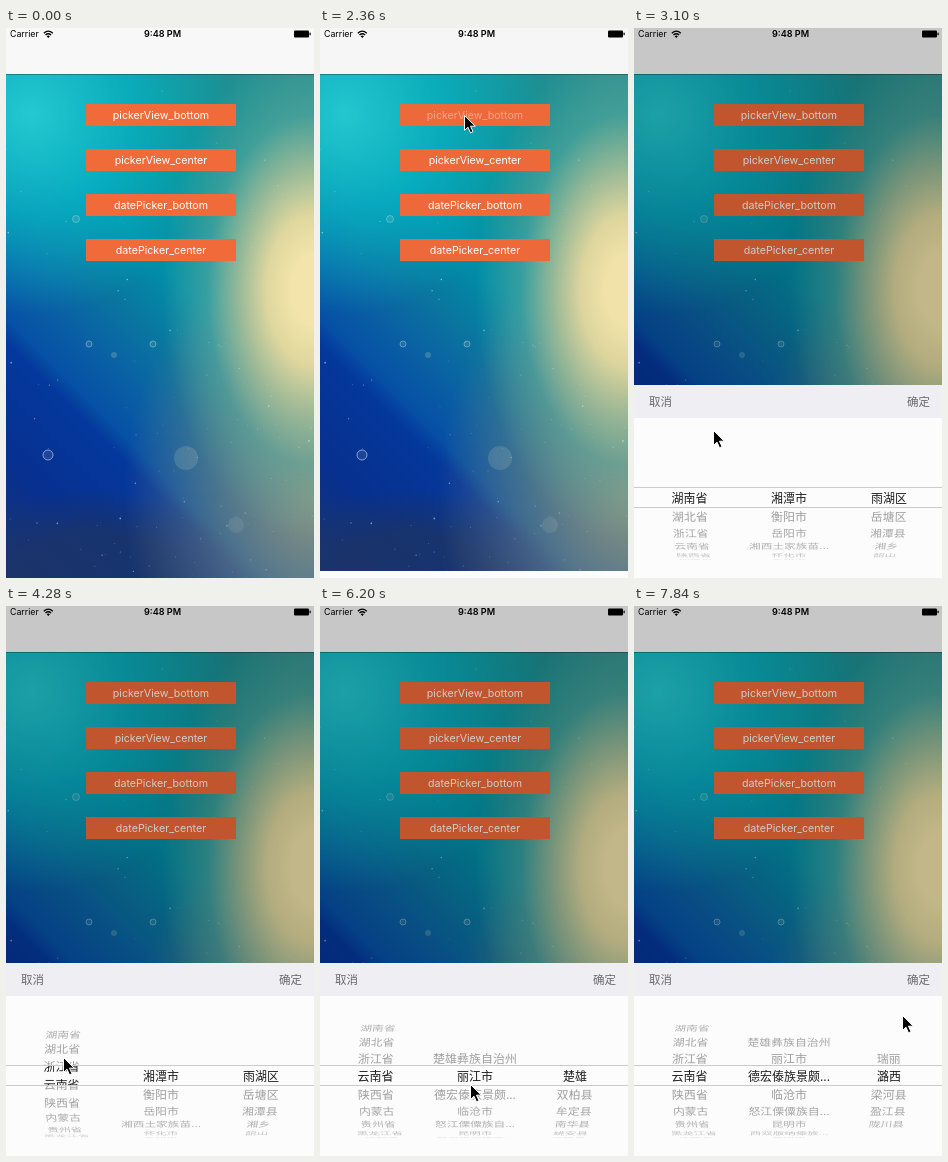
An HTML page that plays this animation: 308x550 px, repeating every 7.99 s.

```html
<!DOCTYPE html>
<html lang="zh-CN">
<head>
<meta charset="utf-8">
<title>Picker demo</title>
<style>
html, body { margin: 0; width: 100%; height: 100%; overflow: hidden; }
#stage { position: relative; width: 308px; height: 550px; overflow: hidden; background: #f8f8f8;
  font-family: Inter, Roboto, "Liberation Sans", sans-serif; }
#stage div, #stage svg { position: absolute; }

#nav { left: 0; top: 0; width: 308px; height: 46px; border-bottom: 1px solid #0000004d; color: #000; }
#nav div { line-height: 12px; top: 0; white-space: nowrap; }
.carrier { left: 4px; font-size: 8.8px; }
.clock { left: 0; width: 313px; text-align: center; font-size: 9.1px; font-weight: 600; }

#sea { left: 0; top: 46px; width: 308px; height: 504px; background:
  radial-gradient(ellipse 150px 250px at 306px 216px, #f2e4aa 0 14%, #dfd79e 30%, #a8bf98e0 49%, #62ad9e88 70%, #40a09800),
  radial-gradient(ellipse 190px 250px at 308px 420px, #a3997dd8, #77867e98 50%, #60808000),
  radial-gradient(circle 200px at 25px 40px, #24c8d0, #08b8cab0 50%, #00a0b800),
  radial-gradient(ellipse 150px 90px at 90px 504px, #1b3468d8 50%, #1b346800),
  linear-gradient(225deg, #2a8f8f, #0a9098 30%, #0090a8 42%, #0a76a0 52%, #0a62a4 60%, #0650a6 68%, #04389c 71%, #073090 85%, #1a3470); }
#specks { left: 0; top: 0; }

.button { left: 80px; width: 150px; height: 22px; line-height: 23px; background: #f06a3a;
  color: #fff; font-size: 10.65px; text-align: center; }
.pressed { color: #ffffff66; }
#dim { inset: 0; background: #000; opacity: 0; }

#sheet { left: 0; top: 0; width: 308px; height: 193px; overflow: hidden; background: #fcfcfc;
  font-family: "Noto Sans CJK SC", "Noto Sans CJK JP", sans-serif; }
#bar { left: 0; top: 0; width: 308px; height: 33px; line-height: 32px; font-size: 11.5px; color: #6a6a6c; }
.open #bar { background: #eeeef3; }
.layer { inset: 0; }
.band { background: #fcfcfc; clip-path: inset(103px 0 71px 0); }
.row { left: -60px; top: -9px; width: 120px; line-height: 18px; font-size: 12px; text-align: center;
  color: #1c1c1c; white-space: nowrap; }
#lines { left: 0; top: 102px; width: 308px; height: 19px; }
.open #lines { border: solid #cbcbcd; border-width: 1px 0; }
#cursor { left: 0; top: 0; overflow: visible; }
</style>
</head>
<body>
<div id="stage">
  <div id="sea"></div>
  <svg id="specks" width="308" height="550"></svg>
  <div id="nav">
    <div class="carrier">Carrier</div>
    <svg style="left:37px;top:2px" width="11" height="9" fill="none" stroke="#000" stroke-width="1.3">
      <path d="M.8 3.2Q5.3 -.9 9.8 3.2M2.5 5Q5.3 2.5 8.1 5"/><path d="M3.7 6.2Q5.3 4.8 6.9 6.2L5.3 8Z" fill="#000" stroke="none"/>
    </svg>
    <div class="clock">9:48 PM</div>
    <svg style="left:288px;top:2px" width="18" height="8"><rect y=".4" width="15" height="7" rx="1.2"/><rect x="15.5" y="2.6" width="1.2" height="2.6" rx=".5"/></svg>
  </div>
  <div id="buttons"></div>
  <div id="dim"></div>
  <div id="sheet">
    <div id="bar"><div style="left:15px">取消</div><div style="left:273px">确定</div></div>
    <div class="layer"></div>
    <div class="layer band"></div>
    <div id="lines"></div>
  </div>
  <svg id="cursor" width="13" height="19">
    <path d="M.5 .5V15.4L4 12.2L6.5 17.8L9 16.7L6.5 11.2H11.3Z" fill="#000" stroke="#fff"/>
  </svg>
</div>
<script>
const LOOP = 7990, STEP = 147.6, LAST = 53;   // the screen is sampled about 7 times a second
const $ = id => document.getElementById(id);

function add(parent, cls, text) {
  const el = document.createElement('div');
  el.className = cls;
  el.textContent = text;
  parent.append(el);
  return el;
}

// Smooth 0..1 between two times
function ease(t, from, to) {
  const u = Math.min(1, Math.max(0, (t - from) / (to - from)));
  return u * u * (3 - 2 * u);
}

// Bubbles and specks in the water
function drawSpecks() {
  let seed = 11, out = '';
  const rnd = () => (seed = seed * 16807 % 2147483647) / 2147483647;
  const dot = (x, y, r, alpha, ring = 0) => out +=
    `<circle cx="${x}" cy="${y}" r="${r}" fill="#e8eecb" fill-opacity="${alpha}" stroke="#cfe8ee" stroke-opacity="${ring}"/>`;
  for (let i = 0; i < 110; i++)
    dot(308 * rnd(), 50 + 498 * Math.sqrt(rnd()), .4 + .5 * rnd() ** 2, .2 + .5 * rnd());
  dot(70, 191, 3.5, .1, .35);
  dot(83, 316, 3, .1, .4);
  dot(147, 316, 3, .1, .4);
  dot(42, 427, 5, .1, .6);
  dot(108, 327, 3, .2);
  dot(180, 430, 12, .15);
  dot(230, 497, 8, .1);
  $('specks').innerHTML = out;
}
drawSpecks();

const buttons = ['pickerView_bottom', 'pickerView_center', 'datePicker_bottom', 'datePicker_center'].map((name, i) => {
  const el = add($('buttons'), 'button', name);
  el.style.top = 76 + 45 * i + 'px';
  return el;
});

// A wheel exists between two steps and rolls by some rows while it is dragged
const layers = document.querySelectorAll('.layer');
function wheel(x, names, { from = 0, to = 99, roll = 0, start = 0, end = 1 }) {
  const rows = names.split(' ').map(name => [...layers].map(l => add(l, 'row', name)));
  return { x, rows, from, to, pos: k => roll * ease(k, start, end) };
}
const RELOAD = 32, RELOAD_AREA = 48;
const wheels = [
  wheel(55.5, '湖南省 湖北省 浙江省 云南省 陕西省 内蒙古 贵州省 黑龙江省 江西省', { roll: 3, start: 26, end: 30 }),
  wheel(155, '湘潭市 衡阳市 岳阳市 湘西土家族苗... 怀化市 永州市', { to: RELOAD }),
  wheel(155, '楚雄彝族自治州 丽江市 德宏傣族景颇... 临沧市 怒江傈僳族自... 昆明市 西双版纳傣族... 保山市',
    { from: RELOAD, roll: 2, start: 38, end: 46 }),
  wheel(255, '雨湖区 岳塘区 湘潭县 湘乡 韶山', { to: RELOAD }),
  wheel(255, '楚雄 双柏县 牟定县 南华县 姚安县 大姚县', { from: RELOAD, to: RELOAD_AREA }),
  wheel(255, '瑞丽 潞西 梁河县 盈江县 陇川县', { from: RELOAD_AREA, roll: 1, start: 49, end: 53 })
];

// Rows sit on a drum seen in slight perspective
const RADIUS = 62.3, TURN = .2932, DEPTH = 900, EYE = 154, MID = 113;

function turnWheel(w, k) {
  const shown = k >= w.from && k < w.to, pos = w.pos(k), away = EYE - w.x;
  w.rows.forEach(([grey, black], i) => {
    const a = (i - pos) * TURN, cos = Math.cos(a), sin = Math.sin(a);
    const z = RADIUS * (1 - cos) / DEPTH;
    const m = [1 - z, 0, away * sin / DEPTH, cos, w.x + away * z, MID + RADIUS * sin];
    const visible = shown && Math.abs(a) < 1.52;
    for (const el of [grey, black]) {
      el.style.display = visible ? '' : 'none';
      el.style.transform = `matrix(${m.map(v => v.toFixed(4))})`;
    }
    grey.style.opacity = visible ? .42 * Math.sqrt(cos) : 0;
  });
}

// Pointer moves: from step, to step, destination
const SHOW = 3, home = [289, 420];
const moves = [
  [3, 6, 189, 360], [7, 10, 138, 128], [10, 14, 144, 87],
  [17, 23, 56, 512], [26, 29, 57, 451], [30, 34, 164, 464], [34, 36, 151, 499],
  [38, 46, 149, 457], [46, 50, 264, 448], [50, 53, 268, 409]
];

function pointer(k) {
  let [x, y] = home;
  for (const [from, to, toX, toY] of moves) {
    const u = ease(k, from, to);
    x += (toX - x) * u;
    y += (toY - y) * u;
  }
  return `translate(${Math.round(x)}px, ${Math.round(y)}px)`;
}

const PRESS = 16, OPEN = 18;

function render(t) {
  const k = Math.min(LAST, Math.floor((t + 15) / STEP));
  const up = ease(k * STEP, 2325, 2635);
  $('dim').style.opacity = .2 * up;
  $('sheet').style.transform = `translateY(${Math.round(550 - 193 * up)}px)`;
  $('sheet').className = k >= OPEN ? 'open' : '';
  buttons[0].classList.toggle('pressed', k >= PRESS && k < OPEN);
  for (const w of wheels) turnWheel(w, k);
  $('cursor').style.display = k < SHOW ? 'none' : '';
  $('cursor').style.transform = pointer(k);
}

const start = performance.now();
function tick() {
  render((performance.now() - start) % LOOP);
  requestAnimationFrame(tick);
}
tick();
</script>
</body>
</html>
```
